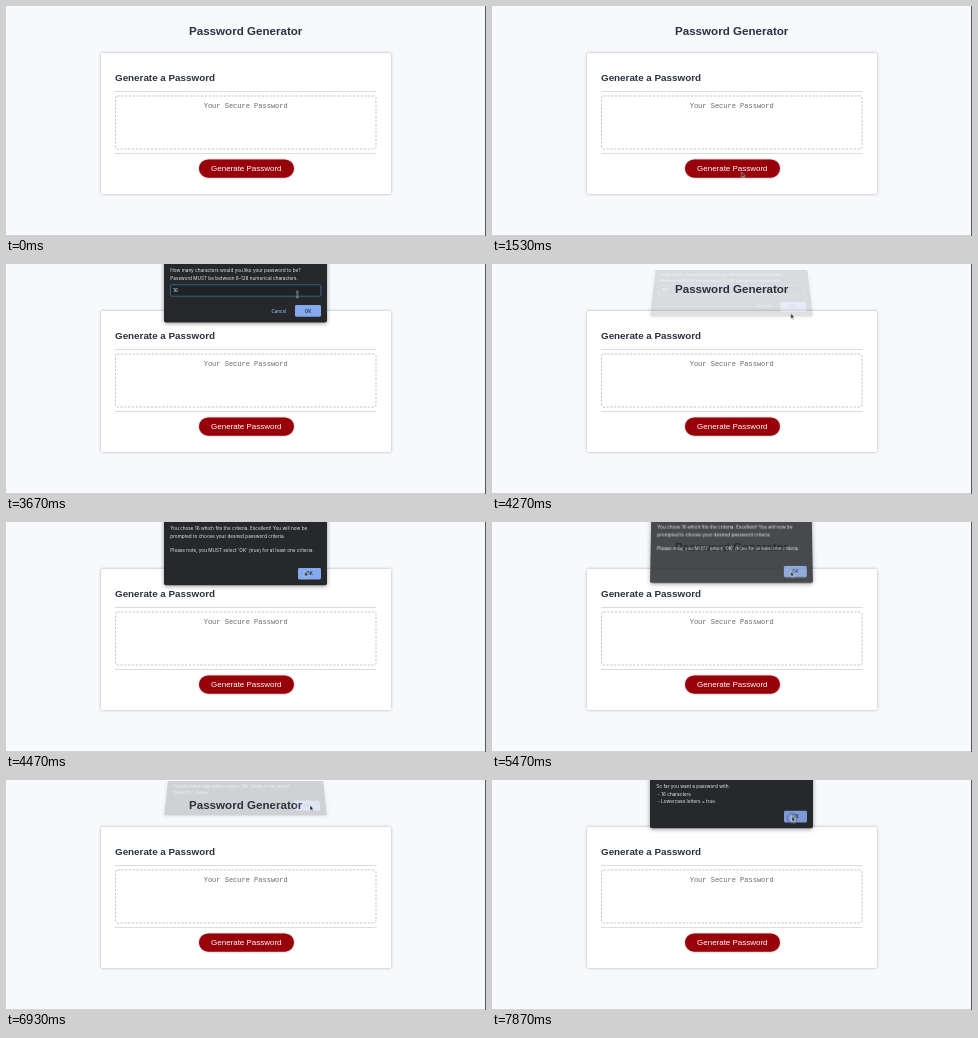
An HTML page for the animation above (8000 ms loop, 480 by 230 pixels).

```html
<!DOCTYPE html>
<html lang="en">
<head>
<meta charset="utf-8">
<title>Password Generator</title>
<style>
  html, body { margin: 0; width: 100%; height: 100%; overflow: hidden; background: #f7f9fd; }
  svg { position: absolute; left: 0; top: 0; width: 480px; height: 230px; overflow: hidden; }
  text { white-space: pre; }
  .page { font-family: "Liberation Sans", Arial, sans-serif; fill: #2b323d; }
  .title { font-weight: bold; }
  .mono { font: 7px "Liberation Mono", monospace; fill: #686868; }
  .card { fill: #fff; filter: drop-shadow(0 .5px 1.5px rgba(0, 0, 0, .3)); }
  .generate { fill: #98000a; filter: drop-shadow(0 .5px 1px rgba(0, 0, 0, .3)); }
  .dialog { font: 4.7px Inter, "Open Sans", sans-serif; fill: #e6e8eb; opacity: 0; }
  .panel { fill: #26282c; filter: drop-shadow(0 1px 2px rgba(0, 0, 0, .4)); }
  .action { font-size: 4.4px; font-weight: 500; text-anchor: middle; }
</style>
</head>
<body>
<svg class="page" viewBox="0 0 480 230">
  <rect width="480" height="230" fill="#f7f9fd"/>
  <text class="title" x="239.7" y="29" font-size="11.6" text-anchor="middle">Password Generator</text>
  <rect class="card" x="95" y="47" width="290" height="141" rx="1.5"/>
  <text class="title" x="109" y="75" font-size="9.83">Generate a Password</text>
  <path d="M109 85.5H370.5M109 147.5H370.5" stroke="#d4d4d4" stroke-width=".8"/>
  <rect x="109.5" y="90" width="260.5" height="53" rx="2" fill="#fff" stroke="#bdbdbd" stroke-width=".9" stroke-dasharray="2.2 1.6"/>
  <text class="mono" x="197.7" y="102">Your Secure Password</text>
  <rect class="generate" x="193" y="153.4" width="95" height="18.4" rx="9.2"/>
  <text x="240.3" y="165" font-size="7.98" text-anchor="middle" fill="#fff">Generate Password</text>
  <path d="M0 229.6H480" stroke="#c3c5c9" stroke-width=".8"/>
  <path d="M479.5 0V230" stroke="#55585c"/>
</svg>
<div id="dialogs"></div>
<svg viewBox="0 0 480 230">
  <g id="cursor">
    <circle id="ring" cx=".3" cy="1.7" r="4.8" fill="#fff" fill-opacity=".12" stroke="#4c5a78" stroke-width=".8"/>
    <path id="arrow" d="M0 0V5.2L1.2 4.1L2.1 6.1L3 5.7L2.1 3.8H3.8Z" fill="#111" stroke="#fff" stroke-width=".5"/>
    <path id="beam" d="M-1.3 -3.2Q0 -3.2 0 -2.2Q0 -3.2 1.3 -3.2M0 -2.2V2.4M-1.3 3.4Q0 3.4 0 2.4Q0 3.4 1.3 3.4" fill="none" stroke="#d5d8dc" stroke-width=".7"/>
  </g>
</svg>
<script>
const LOOP = 8000;
const HOLD = 'steps(1, end)';

// steps: [ms, properties, easing to the next step]
function play(el, steps, easing = HOLD) {
  const frames = steps.map(([ms, props, ease = easing]) => ({ ...props, offset: ms / LOOP, easing: ease }));
  if (frames[0].offset > 0) frames.unshift({ ...frames[0], offset: 0 });
  frames.push({ ...frames[frames.length - 1], offset: 1 });
  el.animate(frames, { duration: LOOP, iterations: Infinity });
}

const show = (el, steps) => play(el, steps.map(([ms, opacity]) => [ms, { opacity }]));

const dialogs = [
  { open: 1870, press: 3930, close: 4070, bottom: 58.5, input: true, cancel: true, lines: [
    'How many characters would you like your password to be?',
    'Password MUST be between 8-128 numerical characters.'] },
  { open: 4440, press: 5270, close: 5400, bottom: 63.3, lines: [
    'You chose 16 which fits the criteria. Excellent! You will now be',
    'prompted to choose your desired password criteria.', '',
    "Please note, you MUST select 'OK' (true) for at least one criteria."] },
  { open: 5700, press: 6470, close: 6740, bottom: 41.2, cancel: true, lines: [
    "To add lowercase letters select 'OK' (true) if not, select",
    "'CANCEL' (false)."] },
  { open: 7100, press: 7830, bottom: 48.2, lines: [
    'So far you want a password with:',
    ' - 16 characters',
    ' - Lowercase letters = true.'] }
];

// ms after closing starts, opacity, tilt in degrees, lift in px
const closing = [[0, 1, 0, 0], [70, .85, 5, 2.2], [130, .5, 18, 4], [200, .15, 31, 6], [260, 0, 36, 7]];

function pose(opacity, tilt = 0, lift = 0) {
  return { opacity, transform: `translateY(${-lift}px) perspective(400px) rotateX(${tilt}deg)` };
}

function markup({ lines, bottom, input, cancel }) {
  const middle = bottom - 11.6;
  const left = cancel ? 289 : 292;
  const text = lines.map((line, i) => `<text x="164.3" y="${8.4 + i * 7.35}">${line}</text>`).join('');
  const field = `<rect x="164.4" y="20.8" width="150.4" height="11.4" rx="1" fill="#1f2327" stroke="#356b91" stroke-width=".9"/>
    <text class="one" x="167" y="28.2">1</text><text class="both" x="167" y="28.2">16</text>
    <path class="caret" d="M167 23.6V29.4" stroke="#e6e8eb" stroke-width=".5"/>`;
  return `<rect class="panel" x="158" y="-20" width="163" height="${bottom + 20}" rx="2"/>${text}${input ? field : ''}
    ${cancel ? `<text class="action" x="272.8" y="${middle + 1.6}" fill="#8ab4f8">Cancel</text>` : ''}
    <rect class="ok" x="${left}" y="${middle - 5.8}" width="${315 - left}" height="11.6" rx="1.4" fill="#86aaf0"/>
    <text class="action" x="${(left + 315) / 2}" y="${middle + 1.6}" fill="#202124">OK</text>`;
}

for (const dialog of dialogs) {
  const svg = document.createElementNS('http://www.w3.org/2000/svg', 'svg');
  svg.setAttribute('class', 'dialog');
  svg.setAttribute('viewBox', '0 0 480 230');
  svg.style.transformOrigin = `239.5px ${dialog.bottom}px`;
  svg.innerHTML = markup(dialog);
  document.getElementById('dialogs').append(svg);

  const steps = [[0, pose(0)], [dialog.open, pose(1)]];
  if (dialog.close) {
    for (const [ms, ...state] of closing) steps.push([dialog.close + ms, pose(...state), 'linear']);
  }
  play(svg, steps);
  play(svg.querySelector('.ok'), [[0, { fill: '#86aaf0' }], [dialog.press, { fill: '#7b9ad6' }]]);
}

const find = selector => document.querySelector(selector);

show(find('.one'), [[0, 0], [2730, 1], [2870, 0]]);
show(find('.both'), [[0, 0], [2870, 1]]);
play(find('.caret'), [
  [0, { opacity: 1, transform: 'none' }],
  [2270, { opacity: 0, transform: 'none' }],
  [2730, { opacity: 1, transform: 'translateX(2.2px)' }],
  [2870, { opacity: 1, transform: 'translateX(5.4px)' }],
  [3370, { opacity: 0, transform: 'translateX(5.4px)' }],
  [3870, { opacity: 1, transform: 'translateX(5.4px)' }]
]);

const path = [
  [800, 266, 190], [1130, 250, 172], [1330, 245, 164], [1530, 249.5, 166.3],
  [3070, 249.5, 166.3], [3270, 262, 120], [3470, 283, 58], [3600, 291, 33], [3670, 291.3, 30.3],
  [3730, 293, 34], [3870, 298.7, 49.5],
  [5930, 298.7, 49.5], [6130, 302, 35], [6330, 304, 25.3],
  [7530, 304, 25.3], [7870, 300, 36.5]
];
play(find('#cursor'), path.map(([ms, x, y]) => [ms, { transform: `translate(${x}px, ${y}px)` }]), 'linear');
show(find('#arrow'), [[0, 0], [800, 1], [3590, 0], [3720, 1]]);
show(find('#beam'), [[0, 0], [3590, 1], [3720, 0]]);
show(find('#ring'), [[0, 0], [3930, 1], [4070, 0], [5270, 1], [5400, 0], [6470, 1], [6670, 0], [7830, 1]]);
</script>
</body>
</html>
```
